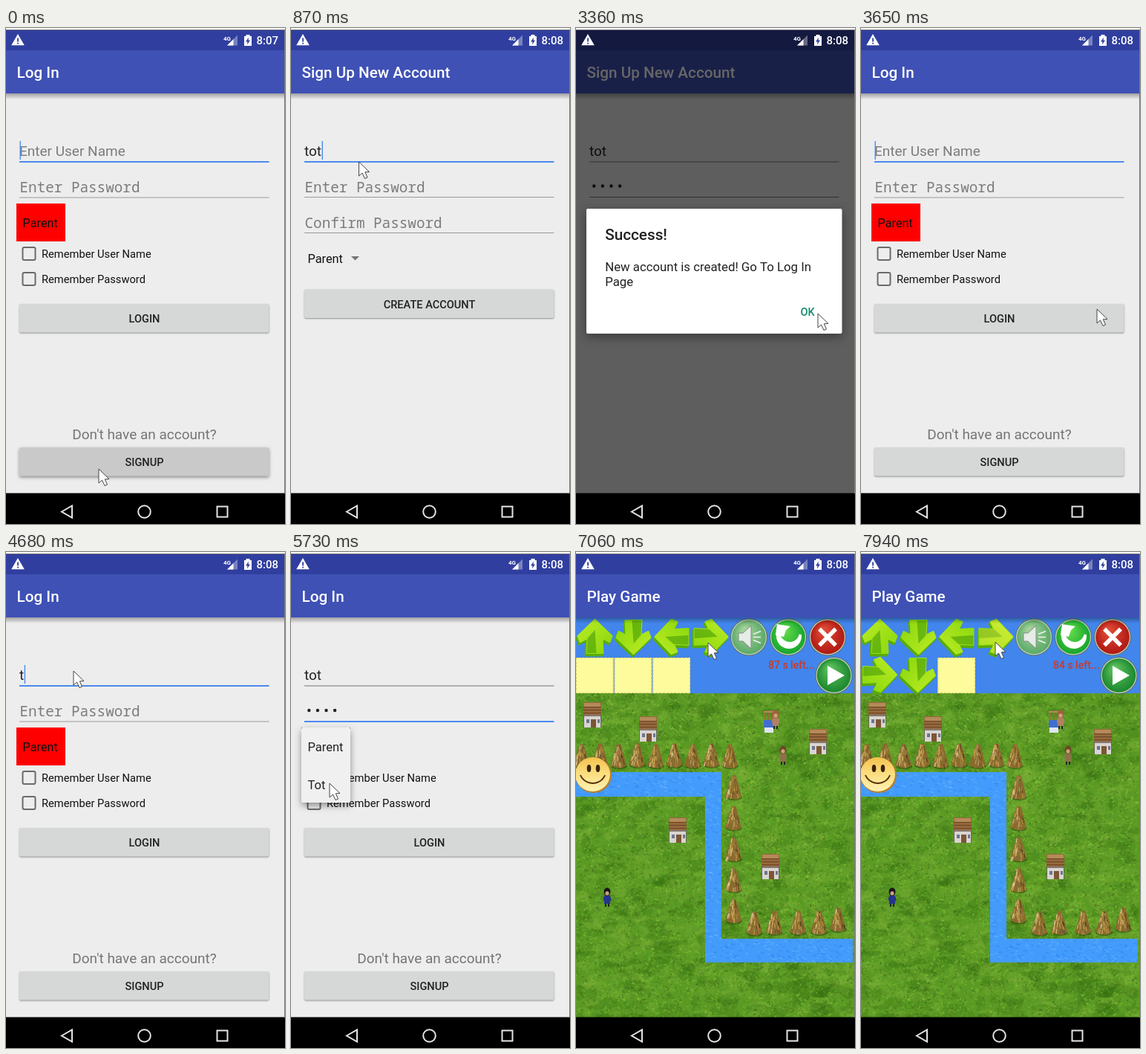
An HTML page with a canvas that plays this animation: 376x667 px, repeating every 8 s.

```html
<!DOCTYPE html>
<html lang="en">
<head>
<meta charset="utf-8">
<title>App demo</title>
<style>
html, body { margin: 0; width: 100%; height: 100%; overflow: hidden; background: #fff; }
canvas { display: block; }
</style>
</head>
<body>
<canvas id="stage" width="376" height="667"></canvas>
<script>
const W = 376, H = 667, LOOP = 8000, STEP = 147, LEAD = 120;
const USER = 'tot', ROLE = 'Tot';
const INK = '#212121', GREY = '#7c7c7c', BLUE = '#4a8af0', PAGE = '#ededed';
const out = document.getElementById('stage').getContext('2d');

const layer = () => {
  const c = document.createElement('canvas');
  c.width = W; c.height = H;
  return c.getContext('2d');
};
const buf = layer(), map = layer();
let g = out; // context the helpers draw on

let seed = 7;
const rnd = (a = 0, b = 1) => {
  seed = (seed * 16807) % 2147483647;
  return a + (b - a) * seed / 2147483647;
};

function box(x, y, w, h, color) { g.fillStyle = color; g.fillRect(x, y, w, h); }

function card(x, y, w, h, color, blur = 2, drop = 1) {
  g.save();
  g.shadowColor = 'rgba(0,0,0,.4)'; g.shadowBlur = blur; g.shadowOffsetY = drop;
  g.fillStyle = color;
  g.beginPath(); g.roundRect(x, y, w, h, 2); g.fill();
  g.restore();
}

function text(str, x, y, size, color = INK, weight = 400, align = 'left', family = 'Roboto, sans-serif') {
  g.font = `${weight} ${size}px ${family}`;
  g.textAlign = align; g.fillStyle = color;
  g.fillText(str, x, y);
}

function poly(points, fill, stroke, width = 1) {
  g.beginPath();
  points.forEach(([x, y]) => g.lineTo(x, y));
  g.closePath();
  if (fill) { g.fillStyle = fill; g.fill(); }
  if (stroke) { g.strokeStyle = stroke; g.lineWidth = width; g.stroke(); }
}

function oval(x, y, rx, ry, fill) {
  g.fillStyle = fill;
  g.beginPath(); g.ellipse(x, y, rx, ry, 0, 0, 7); g.fill();
}

function at(x, y, draw, turn = 0) {
  g.save(); g.translate(x, y); g.rotate(turn); draw(); g.restore();
}

// ---- app pages ----

function appBar(title) {
  box(0, 3, 375, 27, '#303f9f');
  box(0, 30, 375, 58, '#3f51b5');
  text(title, 14.5, 67, 20.7, '#fff', 500);
}

function barShadow() {
  const s = g.createLinearGradient(0, 88, 0, 96);
  s.addColorStop(0, 'rgba(0,0,0,.32)'); s.addColorStop(1, 'rgba(0,0,0,0)');
  box(0, 88, 375, 8, s);
}

function page(title) {
  box(0, 3, 375, 623, PAGE);
  appBar(title);
  barShadow();
}

function button(label, y, hot) {
  card(18, y, 336.5, 38.5, hot ? '#c8c9c8' : '#d6d7d7', hot ? 4 : 2, hot ? 2 : 1);
  text(label, 186.5, y + 25, 14.6, INK, 500, 'center');
}

// One input line; `y` is the underline, `value` a string or a count of dots.
function field(y, value, hint, focused, caret = focused) {
  const secret = typeof value === 'number';
  const count = secret ? value : value.length;
  if (!count) {
    if (secret) text(hint, 18.5, y - 7, 19.3, GREY, 400, 'left', '"Noto Sans Mono", monospace');
    else text(hint, 18, y - 8, 19, GREY);
  } else if (secret) {
    for (let i = 0; i < count; i++) oval(24.3 + 11.6 * i, y - 15, 2.2, 2.2, INK);
  } else text(value, 18, y - 8, 19);
  box(18, focused ? y - 1 : y - .5, 336.5, focused ? 2 : 1, focused ? BLUE : count ? '#777' : '#999');
  if (caret) {
    const end = secret ? count * 11.6 : count ? g.measureText(value).width : 0;
    box(18.5 + end, y - 28, 1.4, 25, BLUE);
  }
}

function checkbox(label, y) {
  g.strokeStyle = '#6a6a6a'; g.lineWidth = 2;
  g.beginPath(); g.roundRect(22.5, y - 8.5, 17, 17, 2); g.stroke();
  text(label, 48, y + 5.5, 14.7, '#111');
}

const typed = (s, from, speed, max) => Math.min(max, Math.max(0, (s - from) * speed));

function login(s) {
  const menu = s === 38;
  page('Log In');
  field(180, USER.slice(0, typed(s, 30, 1, 3)), 'Enter User Name', s < 34);
  field(228, typed(s, 33, 1, 4), 'Enter Password', s >= 34, s >= 34 && !menu);
  box(14, 236, 66, 51, '#f00');
  text(s > 38 ? ROLE : 'Parent', 22.5, 268, 16.3, '#111');
  checkbox('Remember User Name', 303.5);
  checkbox('Remember Password', 337.5);
  button('LOGIN', 371, s === 42);
  text("Don't have an account?", 186.5, 553, 19, '#757575', 400, 'center');
  button('SIGNUP', 564, s < 1);
  if (menu) {
    card(14, 236, 66, 101, '#f0f0f0', 10, 4);
    text('Parent', 22.5, 268, 16.5);
    text(ROLE, 22.5, 318.5, 16.5);
  }
}

function signup(s) {
  page('Sign Up New Account');
  field(180, USER.slice(0, typed(s, 2, 1, 3)), 'Enter User Name', s < 6);
  field(227.5, typed(s, 5, 2, 4), 'Enter Password', s === 6 || s === 7);
  field(275.5, typed(s, 7, 2, 4), 'Confirm Password', s === 8);
  text('Parent', 22.5, 316, 16.3, '#111');
  poly([[81, 307], [92, 307], [86.5, 312.5]], '#757575');
  button('CREATE ACCOUNT', 351.5, s >= 13);
}

function dialog() {
  box(0, 3, 375, 623, 'rgba(0,0,0,.6)');
  card(14, 243, 344.5, 168, '#fff', 14, 4);
  text('Success!', 39.2, 285, 20.7, INK, 500);
  text('New account is created! Go To Log In', 39.2, 327, 16.8);
  text('Page', 39.2, 347, 16.8);
  text('OK', 302.5, 387, 14.5, '#128a6b', 500);
}

// ---- game ----

function house(x, y) {
  at(x, y, () => {
    box(-12, -17, 24, 17, '#96693e');
    box(-11, -16, 22, 5, '#b48a58');
    for (let i = 0; i < 3; i++) box(-12, -11 + i * 4, 24, 1.2, '#6f4526');
    box(-11, 0, 22, 17, '#d9d5d2');
    box(-11, 0, 22, 2, '#857a74');
    box(-2, 6, 7, 11, '#7c5634');
    box(-8, 6, 4, 5, '#6b7590'); box(7, 6, 3, 5, '#6b7590');
    box(-12, 0, 1, 17, '#665'); box(11, 0, 1, 17, '#665');
  });
}

function hay(x, y) {
  at(x, y, () => {
    oval(1, 13, 11, 4, 'rgba(20,50,0,.45)');
    poly([[-2, -16], [3, -17], [7, -4], [11, 12], [4, 16], [-4, 15], [-11, 12], [-6, -4]], '#8a6a2e');
    for (let i = 0; i < 40; i++) {
      const v = rnd(), k = rnd(-1, 1);
      g.strokeStyle = `hsl(${rnd(36, 46)},${rnd(38, 55)}%,${rnd(30, 62) - k * 16}%)`;
      g.lineWidth = 1.3;
      g.beginPath();
      g.moveTo(k * (2 + 7 * v), -16 + 26 * v);
      g.lineTo(k * (3 + 8 * v), -10 + 26 * v);
      g.stroke();
    }
  });
}

function person(x, y, hair, dress) {
  at(x, y, () => {
    box(-4, -2, 8, 11, dress);
    box(-5, 0, 10, 5, dress);
    oval(0, -7, 4.5, 5.5, hair);
    oval(0, -5, 2.6, 2.8, '#cfa07c');
    box(-3, 9, 2, 4, '#222'); box(1, 9, 2, 4, '#222');
  });
}

function smiley(x, y) {
  const skin = g.createLinearGradient(x, y - 24, x, y + 24);
  skin.addColorStop(0, '#f2c04c'); skin.addColorStop(.45, '#fbdc7c'); skin.addColorStop(1, '#fff3b4');
  oval(x + 1, y + 1, 24.5, 24, '#b9802c');
  oval(x, y, 23.5, 23, skin);
  oval(x - 5, y - 8, 2.8, 5, '#3a2208');
  oval(x + 7, y - 8, 2.8, 5, '#3a2208');
  g.strokeStyle = '#5a3208'; g.lineWidth = 2; g.lineCap = 'round';
  g.beginPath(); g.arc(x, y - 6, 18, .45, 2.7); g.stroke();
  g.lineCap = 'butt';
}

function grass() {
  box(0, 190, 375, 477, '#5b9a24');
  for (let i = 0; i < 1100; i++) {
    const shade = rnd() < .5 ? 'rgba(150,190,70,.16)' : 'rgba(30,85,5,.16)';
    oval(rnd(0, 375), rnd(190, 667), rnd(4, 16), rnd(3, 9), shade);
  }
  for (let i = 0; i < 15000; i++) {
    const x = rnd(0, 375), y = rnd(190, 667);
    g.strokeStyle = `hsla(${rnd(80, 100)},${rnd(50, 70)}%,${rnd(20, 57)}%,.45)`;
    g.lineWidth = rnd(.7, 2);
    g.beginPath(); g.moveTo(x, y); g.lineTo(x + rnd(-4, 4), y + rnd(-4, 3)); g.stroke();
  }
}

function river() {
  poly([[0, 296], [196, 296], [196, 520], [373, 520], [373, 552], [174, 552], [174, 329], [0, 329]], '#439bfb');
  g.clip();
  for (let i = 0; i < 2600; i++) {
    const x = rnd(-4, 375), y = rnd(294, 554);
    g.strokeStyle = rnd() < .5 ? 'rgba(130,198,255,.5)' : 'rgba(30,118,232,.45)';
    g.lineWidth = 1;
    g.beginPath(); g.moveTo(x, y); g.quadraticCurveTo(x + 2, y - 2, x + 4, y + 1); g.stroke();
  }
}

function paintMap() {
  g = map;
  g.save();
  g.beginPath(); g.rect(0, 190, 375, 477); g.clip();
  grass();
  river();
  g.restore();
  for (let i = 0; i < 9; i++) hay(7 + i * 25, 275 - i % 2);
  for (let i = 0; i < 5; i++) hay(212, 317 + i * 41.6);
  [[240, 500], [267, 499], [299, 499], [327, 499], [353, 495]].forEach(p => hay(...p));
  [[22, 219], [97, 238], [326, 255], [137, 374], [262, 423]].forEach(p => house(...p));
  for (let i = 0; i < 4; i++) box(254 + i * 5, 213, 1.5, 14, '#a5623c');
  box(253, 214, 18, 2, '#b98a60');
  box(253, 226, 14, 10, '#3f6fd0'); box(254, 236, 12, 7, '#dfe6f2');
  person(269, 225, '#a0603c', '#b08060');
  person(279, 273, '#6b4a25', '#8c7148');
  person(42, 464, '#17151c', '#25358f');
  smiley(22.5, 299);
}

const TURNS = [0, Math.PI, -Math.PI / 2, Math.PI / 2];
const ARROW = [[0, -23], [23, -1], [20, 7], [10, 2], [11, 22], [-11, 22], [-10, 2], [-20, 7], [-23, -1]];

function arrow(x, y, dir, pressed) {
  g.save();
  g.lineJoin = 'round';
  at(x - 1, y + 2, () => poly(ARROW, '#58ab0c', '#58ab0c', 3), TURNS[dir]);
  at(x + .5, y - 1, () => {
    const shine = g.createLinearGradient(-20, -16, 18, 20);
    shine.addColorStop(0, '#b6ea22'); shine.addColorStop(1, '#8cd80e');
    poly(ARROW, shine, shine, 2);
    poly([[-10, 2], [0, -9], [2, 22], [-11, 22]], 'rgba(62,150,8,.55)');
    if (pressed) poly(ARROW, 'rgba(255,240,90,.3)');
  }, TURNS[dir]);
  g.restore();
}

function disc(x, y, light, dark) {
  const fill = g.createRadialGradient(x - 6, y - 10, 3, x, y, 24);
  fill.addColorStop(0, light); fill.addColorStop(1, dark);
  oval(x, y, 25, 25, '#5d7060');
  oval(x, y, 24, 24, '#c3d2c0');
  oval(x, y, 22.8, 22.8, fill);
}

function toolbar(s) {
  const pressed = { 48: 3, 51: 1, 53: 3 }[s];
  box(0, 88, 375, 102, '#4285ec');
  for (let i = 0; i < 4; i++) arrow(25 + i * 52, 115, i, pressed === i);

  const queue = [s >= 49 && 3, s >= 52 && 1, false];
  queue.forEach((dir, i) => {
    const x = i * 51.7;
    if (dir) return arrow(x + 24.5, 166, dir);
    box(x, 142, 50.5, 48, '#fdfb9c');
    g.strokeStyle = '#d9c96a'; g.lineWidth = 1; g.setLineDash([3, 2]);
    g.strokeRect(x + .5, 142.5, 49.5, 47);
    g.setLineDash([]);
  });

  disc(233, 114.5, '#a4d09a', '#58a866');
  poly([[219, 109], [225, 109], [236, 99], [236, 130], [225, 120], [219, 120]], '#e6ece6', '#7d8f80');
  g.strokeStyle = '#eef5ee'; g.lineWidth = 1.5;
  for (const dy of [-8, 0, 8]) {
    g.beginPath(); g.moveTo(239, 114.5 + dy * .5); g.lineTo(249, 114.5 + dy); g.stroke();
  }

  disc(286, 114.5, '#62dc48', '#14a32c');
  g.fillStyle = '#fff';
  g.beginPath(); g.arc(287, 113, 17, -.1, 3.3); g.arc(288, 108, 13, 2.7, .2, true); g.fill();
  poly([[269, 112], [271, 97], [289, 100], [283, 105], [280, 114]], '#fff');

  disc(339, 114.5, '#e04a38', '#ae1710');
  g.strokeStyle = '#fff'; g.lineWidth = 5.5;
  g.beginPath();
  g.moveTo(328, 103.5); g.lineTo(350, 125.5);
  g.moveTo(350, 103.5); g.lineTo(328, 125.5);
  g.stroke();

  disc(347.5, 166, '#5cc05c', '#18852c');
  poly([[339, 153], [339, 179], [362, 166]], '#fff');

  const left = 89 - Math.max(0, Math.floor((s - 43) / 2));
  text(left + ' s left...', 259, 157, 14, '#cc3a28', 500);
}

function game(s) {
  appBar('Play Game');
  g.drawImage(map.canvas, 0, 0);
  toolbar(s);
  barShadow();
}

// ---- system bars and pointer ----

function statusIcons(clock) {
  poly([[16, 9.5], [23.5, 22.5], [8.5, 22.5]], '#fff', '#fff', 1.5);
  box(15.2, 13.5, 1.8, 5, '#303f9f'); box(15.2, 19.8, 1.8, 1.8, '#303f9f');
  text('4G', 293, 16.5, 8, '#fff', 700);
  poly([[298, 23.5], [312, 23.5], [312, 9.5]], 'rgba(255,255,255,.35)');
  poly([[298, 23.5], [306.5, 23.5], [306.5, 15]], '#fff');
  box(323.5, 9, 5, 3, '#fff'); box(321, 11, 10, 13, '#fff');
  poly([[327, 12.5], [323, 18.5], [325.5, 18.5], [325, 22.5], [329, 16.5], [326.5, 16.5]], '#303f9f');
  text(clock, 367, 22, 15, '#fff', 500, 'right');
}

function navIcons() {
  poly([[75, 650.5], [89, 642.5], [89, 658.5]], null, '#e4e4e4', 2);
  g.strokeStyle = '#e4e4e4'; g.lineWidth = 2;
  g.beginPath(); g.arc(186.5, 650.5, 8.3, 0, 7); g.stroke();
  g.strokeRect(284.5, 643.5, 14, 14);
}

// Pointer stops: step, x, y
const STOPS = [[-1, 125, 593], [0, 125, 593], [3, 91.5, 180], [15, 91.5, 180], [16, 118, 372],
  [17, 122, 376], [18, 122, 376], [21, 326, 384], [23, 326, 384], [24, 318, 378], [29, 91, 160],
  [35, 91, 160], [37, 52, 258], [38, 52, 311], [39, 52, 311], [41, 96.5, 389], [44, 96.5, 389],
  [45, 130, 240], [47, 178, 122], [49, 178, 122], [50, 80, 126], [51, 80, 126], [53, 181, 121]];

function pointer(s) {
  const i = Math.max(1, STOPS.findIndex(p => p[0] >= s));
  const [s0, x0, y0] = STOPS[i - 1], [s1, x1, y1] = STOPS[i];
  const k = (s - s0) / (s1 - s0);
  at(x0 + (x1 - x0) * k, y0 + (y1 - y0) * k, () => poly(
    [[0, 0], [0, 19], [4.5, 15], [8, 22.5], [11.5, 21], [8.3, 13.8], [14, 13.5]], '#fff', '#444', 1));
}

function show(draw, s, entering) {
  g = buf;
  g.clearRect(0, 0, W, H);
  draw(s);
  out.globalAlpha = entering ? .67 : 1;
  out.drawImage(buf.canvas, 0, entering ? 25 : 0);
  out.globalAlpha = 1;
  g = out;
}

function frame() {
  const s = Math.min(53, Math.floor((performance.now() % LOOP - LEAD) / STEP));
  const entering = s === 0 || s === 23 || s === 43;
  g = out;
  box(0, 0, W, H, '#fff');
  box(0, 625.5, W, 42, '#000');
  if (s < 1 || s > 23 && s < 44) show(login, s);
  if (s > 0 && s < 24) show(signup, s);
  if (s === 0) show(signup, s, true);
  if (s === 23) show(login, s, true);
  if (s > 42) show(game, s, entering);
  if (s > 16 && s < 23) dialog();
  if (entering) box(0, 3, 375, 25, '#303f9f');
  else box(0, 625.5, W, 42, '#000');
  box(0, 2, W, 1, '#777');
  box(375, 2, 1, 624, '#777');
  statusIcons(s < 1 ? '8:07' : '8:08');
  navIcons();
  pointer(s);
  requestAnimationFrame(frame);
}

paintMap();
frame();
</script>
</body>
</html>
```
